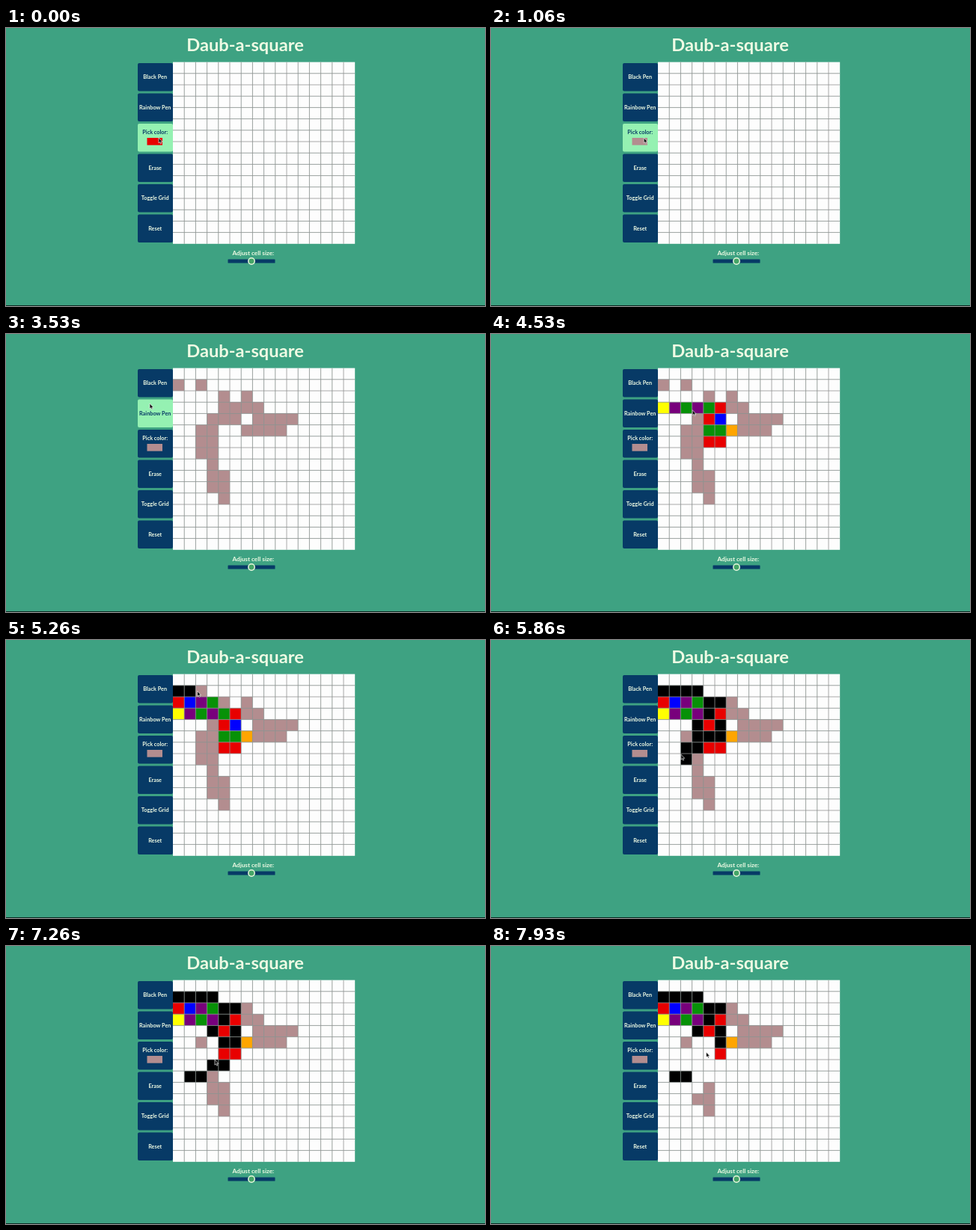
An HTML page that plays this animation: 640 by 372 pixels, repeating every 8 s.

```html
<!DOCTYPE html>
<html lang="en">
<head>
<meta charset="utf-8">
<title>Daub-a-square</title>
<style>
  html, body { margin: 0; width: 100%; height: 100%; overflow: hidden; background: #3ea282; }
  svg { display: block; width: 100vw; height: 100vh; }
  text { font-family: Lato, "Open Sans", sans-serif; font-weight: 700; text-anchor: middle; fill: #effbe4; }
  .button rect { fill: #073a66; }
  .button text { font-size: 7.3px; }
  .button.hover rect { fill: #95f1b2; }
  .button.hover text { fill: #073a66; }
</style>
</head>
<body>
<svg id="stage" viewBox="0 0 640 372" preserveAspectRatio="none">
  <rect width="640" height="372" fill="#3ea282"/>
  <rect y="371" width="640" height="1" fill="#0b2922"/>
  <text x="319.5" y="31" font-size="23.7">Daub-a-square</text>
  <g id="buttons"></g>
  <rect id="swatch" x="188.5" y="147" width="20.5" height="9.7"/>
  <g id="cells"></g>
  <path id="lines" fill="none" stroke="#929292" stroke-width=".8"/>
  <text x="330.3" y="304" font-size="8.2">Adjust cell size:</text>
  <rect x="296.5" y="309.5" width="63" height="5" rx=".6" fill="#073a66"/>
  <circle cx="328" cy="312" r="4.2" fill="#45a567" stroke="#e9f8df" stroke-width="1.5"/>
  <path id="pointer" d="M0 0V7L1.6 5.6 2.7 8 3.9 7.5 2.8 5.2H5Z" fill="#111" stroke="#fff" stroke-width=".6"/>
</svg>
<script>
const LOOP = 8000, COUNT = 16, SIZE = 15.2, LEFT = 223, TOP = 45.6;
const PINK = '#b38d8f', RED = '#e80000', BLACK = '#000', WHITE = '#fdfdfd';
const RAINBOW = { r: RED, o: '#ffa500', y: '#ffff00', g: '#079107', b: '#0000ff', p: '#78007c' };
const $ = id => document.getElementById(id);

function add(parent, tag, attrs, text = '') {
  const node = document.createElementNS('http://www.w3.org/2000/svg', tag);
  for (const key in attrs) node.setAttribute(key, attrs[key]);
  node.textContent = text;
  return parent.appendChild(node);
}

const buttons = ['Black Pen', 'Rainbow Pen', 'Pick color:', 'Erase', 'Toggle Grid', 'Reset'].map((label, i) => {
  const y = 47 + i * 40.5;
  const group = add($('buttons'), 'g', { class: 'button' });
  add(group, 'rect', { x: 176, y, width: 47, height: 37.6, rx: 2 });
  add(group, 'text', { x: 199.2, y: y + (i === 2 ? 13.7 : 21) }, label);
  return group;
});

const cells = Array.from({ length: COUNT * COUNT }, (_, i) => add($('cells'), 'rect', {
  x: LEFT + i % COUNT * SIZE, y: TOP + Math.floor(i / COUNT) * SIZE, width: SIZE, height: SIZE, fill: WHITE
}));

let lines = '';
for (let i = 1; i < COUNT; i++) {
  lines += `M${LEFT + i * SIZE} ${TOP}v${COUNT * SIZE}M${LEFT} ${TOP + i * SIZE}h${COUNT * SIZE}`;
}
$('lines').setAttribute('d', lines);

const track = [], paints = [];
const move = (time, x, y) => track.push({ time, x, y });

// Each word is a column and a row in hex, with an optional rainbow letter.
function stroke(start, end, color, path) {
  const words = path.split(' ');
  words.forEach((word, i) => {
    const col = parseInt(word[0], 16), row = parseInt(word[1], 16);
    const time = start + (end - start) * i / (words.length - 1);
    move(time, LEFT + (col + .5) * SIZE, TOP + (row + .5) * SIZE);
    paints.push({ time, cell: row * COUNT + col, color: color || RAINBOW[word[2]] });
  });
}

move(0, 204, 147);
move(1060, 204, 147);
move(1660, 337, 114);
stroke(1930, 2080, PINK, '74 84 94 a4');
move(2130, 360.5, 123.5);
stroke(2160, 3330, PINK,
  '95 85 75 65 54 44 34 35 25 26 27 37 38 39 3a 4b 4a 49 38 37 36 35 44 53 73 63 62 43 42 21 01');
move(3530, 192, 93);
move(3660, 197, 104);
move(3860, 197, 104);
stroke(3930, 4500, null, '03y 13p 23g 33b 43o 53r 54b 65o 55g 56r 46r 45g 44r 43g 33p');
move(4530, 269, 102);
stroke(4590, 4790, null, '32g 22p 12b 02r');
move(4930, 199, 68);
move(5130, 199, 68);
stroke(5200, 5830, BLACK, '01 11 21 31 42 52 43 34 35 45 55 54 55 45 35 36 26 27');
move(5860, 253.5, 153);
stroke(5950, 6250, BLACK, '37 47 37 28 18');
move(6420, 203, 186);
move(6620, 203, 186);
stroke(6720, 7200, WHITE, '07 17 27 26 36 35 36');
move(7260, 279, 152);
stroke(7300, 7840, WHITE, '37 38 39 38 47 46 45');
move(7930, 287.5, 142);
move(LOOP, 287.5, 142);

function draw(time) {
  const next = track.findIndex(p => p.time > time);
  const a = track[next - 1], b = track[next];
  const k = (time - a.time) / (b.time - a.time);
  const x = a.x + (b.x - a.x) * k, y = a.y + (b.y - a.y) * k;
  $('pointer').setAttribute('transform', `translate(${x} ${y})`);

  const hovered = x < LEFT ? Math.floor((y - 45.5) / 40.5) : -1;
  buttons.forEach((button, i) => button.classList.toggle('hover', i === hovered));
  $('swatch').setAttribute('fill', time < 860 ? RED : PINK);

  const colors = {};
  for (const p of paints) if (p.time <= time) colors[p.cell] = p.color;
  cells.forEach((cell, i) => cell.setAttribute('fill', colors[i] || WHITE));
}

const began = performance.now();
function tick() {
  draw((performance.now() - began) % LOOP);
  requestAnimationFrame(tick);
}
tick();
</script>
</body>
</html>
```
